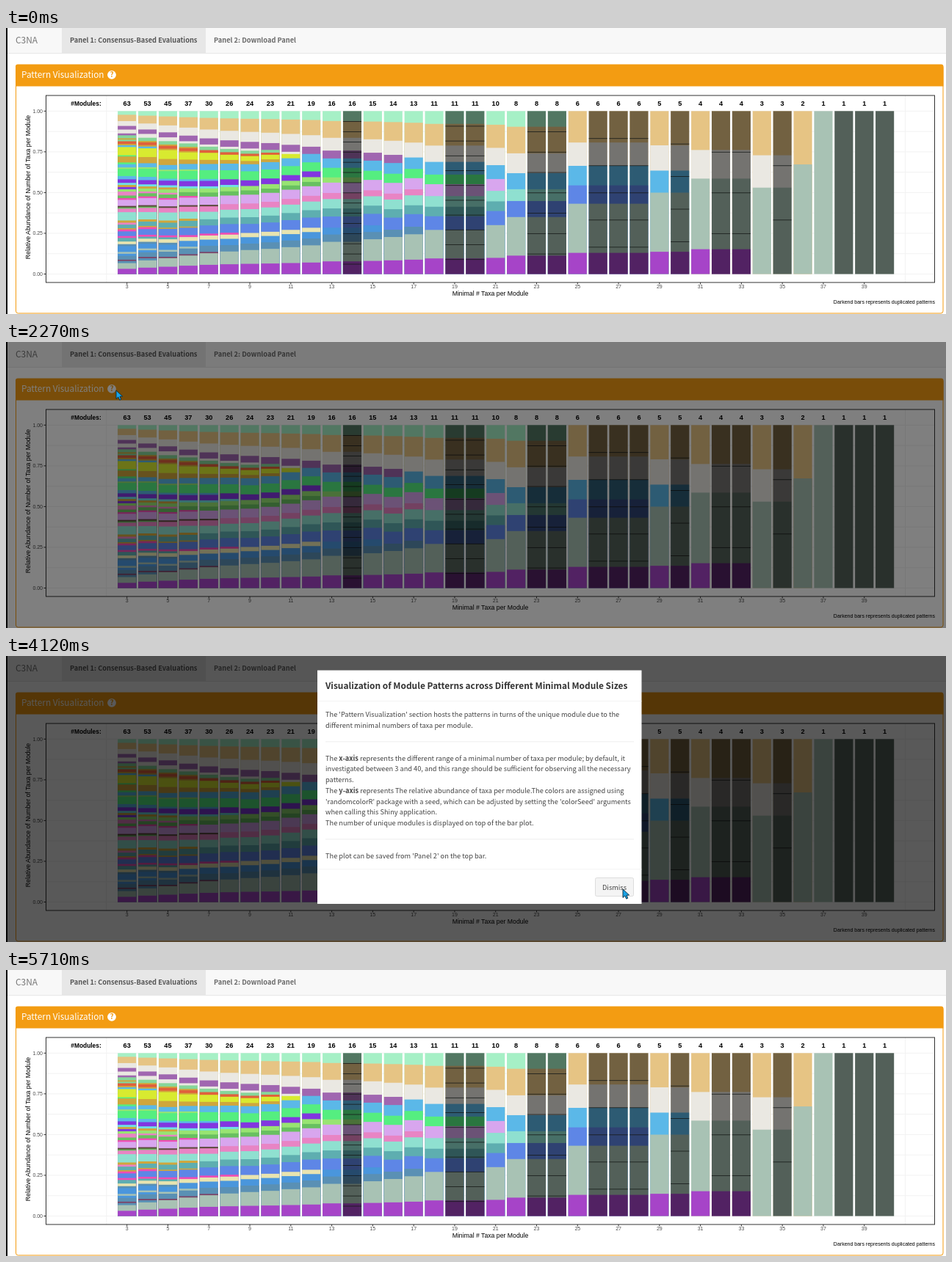
Write an HTML page that moves like this. It is 1280x390 px and loops after 6.27 s.

```html
<!DOCTYPE html>
<html lang="en">
<head>
<meta charset="utf-8">
<title>Pattern Visualization</title>
<style>
html, body { margin: 0; width: 100%; height: 100%; overflow: hidden; background: #fff; }
svg { display: block; width: 100vw; height: 100vh; }
text { white-space: pre; }
.ui { font-family: "Noto Sans CJK JP", "Noto Sans CJK SC", "Noto Sans CJK", Lato, sans-serif; }
.plot { font-family: "Liberation Sans", Arial, sans-serif; }
</style>
</head>
<body>
<svg id="stage" viewBox="0 0 1280 390" preserveAspectRatio="none"></svg>
<script>
const LOOP = 6270, TOP = 113.3, BASE = 335.5, STEP = 27.89, BAR_W = 25.1;
const stage = document.getElementById('stage');

function add(parent, tag, attrs, content) {
  const el = document.createElementNS('http://www.w3.org/2000/svg', tag);
  for (const k in attrs) el.setAttribute(k, attrs[k]);
  if (content !== undefined) el.textContent = content;
  parent.appendChild(el);
  return el;
}
const rect = (p, x, y, width, height, fill, more) => add(p, 'rect', { x, y, width, height, fill, ...more });
const line = (p, x1, y1, x2, y2, stroke) => add(p, 'line', { x1, y1, x2, y2, stroke });
const label = (p, x, y, size, fill, str, more) =>
  add(p, 'text', { x, y, 'font-size': size, fill, ...more }, str);

const bold = { 'font-weight': 700 }, mid = { 'text-anchor': 'middle' }, end = { 'text-anchor': 'end' };
const clamp = v => Math.max(0, Math.min(1, v));
const barX = n => 164.7 + (n - 3) * STEP;

function seeded(seed) {
  return () => (seed = seed * 16807 % 2147483647) / 2147483647;
}

// ---- page ----
const page = add(stage, 'g', {});
rect(page, 0, 0, 1280, 390, '#fff');
rect(page, 0, 0, 1280, 34, '#f8f8f8');
rect(page, 0, 34, 1280, 1, '#e7e7e7');
rect(page, 76, 0, 196, 34, '#e7e7e7');
const ui = add(page, 'g', { class: 'ui' });
label(ui, 13, 21, 11.9, '#777', 'C3NA');
label(ui, 87, 20, 9.25, '#555', 'Panel 1: Consensus-Based Evaluations', bold);
label(ui, 283, 20, 9.25, '#6a6a6a', 'Panel 2: Download Panel', bold);
rect(page, 13.5, 50.5, 1262.5, 338.5, '#fff', { rx: 3, stroke: '#f39c12' });
add(page, 'path', { d: 'M13 79.4V52.5Q13 49.5 16 49.5H1273.5Q1276.5 49.5 1276.5 52.5V79.4Z', fill: '#f39c12' });
const head = add(page, 'g', { class: 'ui' });
label(head, 21, 68.2, 11.8, '#fff', 'Pattern Visualization');
add(head, 'circle', { cx: 144, cy: 63.8, r: 5.9, fill: '#fff' });
label(head, 144, 67.4, 10, '#f39c12', '?', { ...bold, ...mid });

// ---- chart ----
// modules from top to bottom: hue, last bar, height in bar 7, height in the last bar
const MODULES = [
  ['#a6f0c6', 24, 10, 21], ['#e6c484', 36, 17, 60], ['#eae8e2', 35, 13, 42], ['#a066b0', 16, 9, 11],
  ['#86d69a', 10, 5, 4], ['#e0603c', 10, 4, 3], ['#d8ea30', 11, 8, 6], ['#d0a63c', 10, 6, 4],
  ['#5bb8e8', 30, 9, 30], ['#55ee80', 20, 13, 12], ['#8236e0', 12, 8, 8], ['#98e472', 14, 6, 7],
  ['#68c060', 12, 6, 6], ['#d8a6ee', 21, 12, 16], ['#e884c4', 17, 8, 8], ['#8fe0d0', 24, 11, 15],
  ['#5eaeb0', 21, 9, 13], ['#5e86e6', 28, 12, 24], ['#e8e4b0', 12, 6, 6], ['#4a96dc', 15, 9, 9],
  ['#5a90b4', 17, 9, 10], ['#a8c2b4', 40, 17, 162], ['#a644c8', 33, 13.5, 33]
].map(([hue, last, from, to]) => ({
  hue, last, height: n => from * (to / from) ** ((n - 7) / (last - 7))
}));
const ACCENTS = ['#7c4468', '#f04cb4', '#9aa0e8', '#5c4a3c', '#d0a63c', '#6fe0e4'];
const counts = ('63 53 45 37 30 26 24 23 21 19 16 16 15 14 13 11 11 11 10 ' +
  '8 8 8 6 6 6 6 5 5 4 4 4 3 3 2 1 1 1 1').split(' ').map(Number);

// thin modules, tucked in after a main one of similar hue
const rnd = seeded(41);
const extras = Array.from({ length: 42 }, (_, i) => {
  const slot = 3 + i * 7 % 18;
  const near = MODULES[Math.min(21, slot + Math.floor(rnd() * 5) - 1)].hue;
  const hue = rnd() < 0.7 ? near : ACCENTS[Math.floor(rnd() * ACCENTS.length)];
  return { slot, hue, h: 1.6 + rnd() * 1.4 };
});

function segments(n) {
  const alive = MODULES.filter(m => m.last >= n);
  const thin = extras.slice(0, counts[n - 3] - alive.length);
  const sum = list => list.reduce((a, b) => a + b, 0);
  const room = BASE - TOP - sum(thin.map(e => e.h));
  const scale = room / sum(alive.map(m => m.height(n)));
  return alive.flatMap(m => [
    { hue: m.hue, h: m.height(n) * scale },
    ...thin.filter(e => MODULES[e.slot] === m)
  ]);
}

const plot = add(page, 'g', { class: 'plot' });
for (let i = 0; i < 9; i++) line(plot, 54, BASE - i * 27.77, 1264, BASE - i * 27.77, '#f2f2f2');
for (const n of [2, 41]) line(plot, barX(n), 92, barX(n), 347, '#f2f2f2');

counts.forEach((count, i) => {
  const x = barX(i + 3) - BAR_W / 2;
  let y = TOP;
  for (const s of segments(counts.indexOf(count) + 3)) {
    rect(plot, x, y, BAR_W, BASE - y, s.hue);
    y += s.h;
  }
  // a repeated count is a duplicated pattern
  if (count === counts[i - 1]) {
    rect(plot, x, TOP, BAR_W, BASE - TOP, '#000', { opacity: 0.5 });
    for (let k = 1; k < count; k++)
      rect(plot, x, BASE - k * (BASE - TOP) / count, BAR_W, 0.8, '#161a18');
  }
  label(plot, barX(i + 3), 105.8, 9.2, '#000', count, { ...mid, ...bold });
});
label(plot, 109, 105.8, 8.4, '#000', '#Modules:', { ...mid, ...bold });
rect(plot, 54.5, 92, 1210, 255, 'none', { stroke: '#333' });

for (let i = 0; i <= 4; i++) {
  const y = BASE - i * 55.55;
  line(plot, 51.5, y, 54, y, '#333');
  label(plot, 50, y + 2.5, 7, '#4d4d4d', (i / 4).toFixed(2), end);
}
for (let n = 3; n < 40; n += 2) {
  line(plot, barX(n), 347, barX(n), 349.5, '#333');
  label(plot, barX(n), 355.3, 7, '#4d4d4d', n, mid);
}
label(plot, 659.5, 365.2, 8.7, '#000', 'Minimal # Taxa per Module', mid);
label(plot, 0, 0, 8.7, '#000', 'Relative Abundance of Number of Taxa per Module',
  { ...mid, transform: 'translate(32.5 217) rotate(-90)' });
label(plot, 1265, 376, 7, '#000', 'Darkend bars represents duplicated patterns', end);

// ---- dialog ----
const veil = rect(stage, 0, 0, 1280, 390, '#000');
const modal = add(stage, 'g', { class: 'ui' });
rect(modal, 0, 0, 1280, 390, '#000', { opacity: 0.3 });
const dialog = add(modal, 'g', {});
rect(dialog, 424, 19.5, 441.5, 318.5, '#fff');
label(dialog, 435, 45, 11.9, '#333', 'Visualization of Module Patterns across Different Minimal Module Sizes', bold);
for (const y of [61, 290.5]) rect(dialog, 424, y, 441.5, 0.8, '#f0f0f0');
for (const y of [116.5, 249.5]) rect(dialog, 435, y, 420, 0.8, '#eaeaea');

// *word* is set in bold
function prose(y, str) {
  const el = label(dialog, 435, y, 9.25, '#444', '');
  str.split('*').forEach((part, i) => add(el, 'tspan', { 'font-weight': i % 2 ? 700 : 400 }, part));
}
const para = (y, rows) => rows.forEach((row, i) => prose(y + i * 14.75, row));
para(83, ["The 'Pattern Visualization' section hosts the patterns in turns of the unique module due to the",
  'different minimal numbers of taxa per module.']);
para(142.7, ['The *x-axis* represents the different range of a minimal number of taxa per module; by default, it',
  'investigated between 3 and 40, and this range should be sufficient for observing all the necessary',
  'patterns.',
  'The *y-axis* represents The relative abundance of taxa per module.The colors are assigned using',
  "'randomcolorR' package with a seed, which can be adjusted by setting the 'colorSeed' arguments",
  'when calling this Shiny application.',
  'The number of unique modules is displayed on top of the bar plot.']);
para(275.8, ["The plot can be saved from 'Panel 2' on the top bar."]);
rect(dialog, 802.5, 302.5, 52, 25, '#f4f4f4', { rx: 2, stroke: '#ddd' });
label(dialog, 828.5, 318.7, 9.25, '#444', 'Dismiss', mid);

// ---- pointer ----
rect(stage, 0, 0, 2, 390, '#000');
const pointer = add(stage, 'g', { fill: '#19a3e6', stroke: '#0b2a3c', 'stroke-width': 0.9, 'stroke-linejoin': 'round' });
const arrow = add(pointer, 'path', { d: 'M0 0V11.5L2.8 9L4.8 13.2L6.8 12.2L5 8.3L8.6 8Z' });
const hand = add(pointer, 'path', {
  d: 'M-1.3 1.2Q0 -.6 1.3 1.2V5L6 6Q8 6.5 8 8.5V10.5Q7.8 12 6.8 14H.2Q-2 11.5 -4 9Q-4 7 -1.3 8.4Z'
});
// time, x, y
const PATH = [
  [310, 640, 392], [920, 235, 150], [1130, 134, 52], [1270, 70, 70], [1450, 158, 62.5],
  [1660, 150, 66], [2480, 150, 66], [2720, 168, 110], [3410, 633, 317], [3750, 740, 330],
  [4050, 840, 318], [4380, 840, 318], [4500, 843, 321.5], [4980, 843, 321.5], [5250, 940, 392]
];

function along(points, t) {
  let i = 1;
  while (i < points.length - 1 && points[i][0] < t) i++;
  const a = points[i - 1], b = points[i], k = clamp((t - a[0]) / (b[0] - a[0]));
  return [1, 2].map(j => a[j] + (b[j] - a[j]) * k);
}

// cubic-bezier(0, 0, .58, 1)
function easeOut(x) {
  let lo = 0, hi = 1;
  for (let i = 0; i < 24; i++) {
    const s = (lo + hi) / 2;
    if (1.74 * s * s * (1 - s) + s * s * s < x) lo = s; else hi = s;
  }
  return 3 * lo * lo - 2 * lo * lo * lo;
}
const ramp = (t, from, len) => clamp((t - from) / len);
const between = (t, a, b) => t >= a && t < b;

function draw(t) {
  veil.setAttribute('opacity', 0.5 * (ramp(t, 2120, 150) - ramp(t, 4700, 150)));
  const drop = easeOut(ramp(t, 2273, 300)) - easeOut(ramp(t, 4380, 300));
  modal.setAttribute('opacity', ramp(t, 2273, 150) - ramp(t, 4380, 150));
  dialog.setAttribute('transform', `translate(0 ${-80 * (1 - drop)})`);

  const [x, y] = along(PATH, t);
  const isHand = between(t, 1400, 2130) || between(t, 4400, 4980);
  pointer.setAttribute('transform', `translate(${x} ${y})`);
  pointer.setAttribute('display', between(t, 310, 5250) ? 'inline' : 'none');
  hand.setAttribute('display', isHand ? 'inline' : 'none');
  arrow.setAttribute('display', isHand ? 'none' : 'inline');
}

const start = performance.now();
function tick() {
  draw((performance.now() - start) % LOOP);
  requestAnimationFrame(tick);
}
draw(0);
requestAnimationFrame(tick);
</script>
</body>
</html>
```
